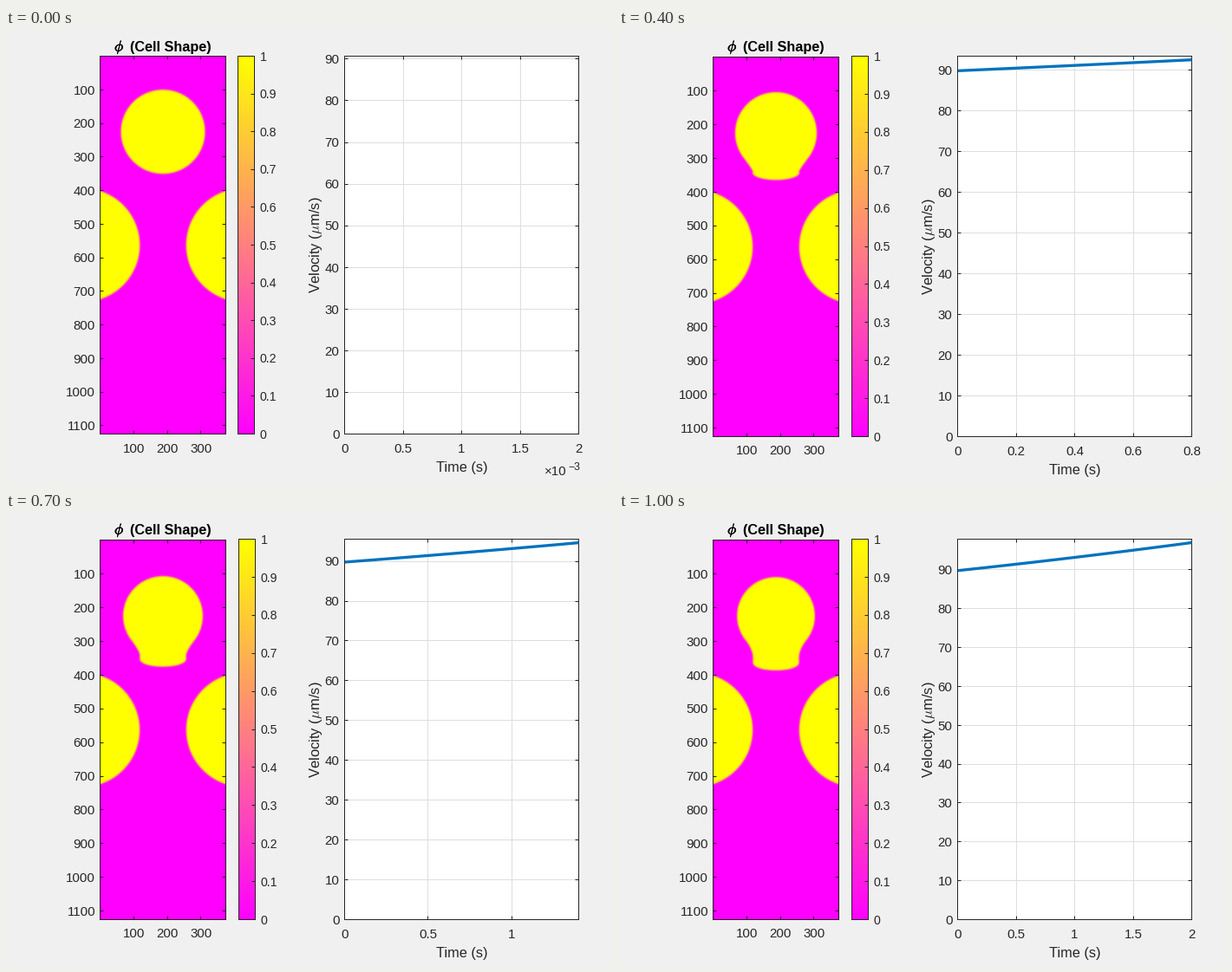
A matplotlib script that plays this animation: 700x525 px, repeating every 1.1 s.

```python
import matplotlib.pyplot as plt
import numpy as np
from matplotlib.animation import FuncAnimation
from matplotlib.patches import Rectangle
from matplotlib.path import Path
from matplotlib.patheffects import withStroke

W, H, DPI = 700, 525, 100
PX = 72 / DPI  # points per pixel
FRAMES = 11
DARK, GRID, BLUE = "#262626", "#dedede", "#0072bd"
TICK, BAR_TICK, LABEL = 15, 14.1, 16.3

plt.rcParams["font.family"] = "Liberation Sans"
plt.rcParams["mathtext.fontset"] = "cm"

fig = plt.figure(figsize=(W / DPI, H / DPI), dpi=DPI, facecolor="#f0f0f0")
ax = fig.add_axes([0, 0, 1, 1])


def line(xs, ys, color=DARK, width=1, z=4):
    return ax.plot(xs, ys, color=color, lw=width * PX, zorder=z, snap=False,
                   solid_capstyle="butt")[0]


def mid(v):
    """Centre of the pixel that holds v, for crisp hairlines."""
    return np.floor(v + 1e-6) + 0.5


def vline(x, y0, y1, color=DARK, z=4):
    line([mid(x)] * 2, [y0, y1], color, z=z)


def hline(y, x0, x1, color=DARK, z=4):
    line([x0, x1], [mid(y)] * 2, color, z=z)


def text(x, y, s, size=TICK, ha="center", color=DARK, **kw):
    ax.text(x, y, s, fontsize=size * PX, ha=ha, va="baseline", color=color,
            zorder=6, **kw)


def box(x0, y0, x1, y1, fill="none", z=4):
    patch = Rectangle((x0, y0), x1 - x0, y1 - y0, facecolor=fill,
                      edgecolor=DARK if fill == "none" else "none",
                      lw=PX, zorder=z, snap=False, joinstyle="miter")
    return ax.add_patch(patch)


def x_ticks(xs, y0, y1, size=4):
    for x in xs:
        vline(x, y0, y0 + size)
        vline(x, y1 - size, y1)


def y_ticks(ys, x0, x1, size=4, both=True):
    for y in ys:
        hline(y, x1 - size, x1)
        if both:
            hline(y, x0, x0 + size)


def cell_outline(n, cy):
    """Half widths and heights of the cell, from its top to its lowest point."""
    r = 48.5 - 0.37 * n
    if n == 0:
        a = np.linspace(0, np.pi, 400)
        return r * np.sin(a), cy - r * np.cos(a)

    def key(*vals):
        return np.interp(n, [1, 3, 6, 10], vals)

    theta = np.radians(key(39, 53, 53, 52))
    neck = key(28.5, 26.8, 26.7, 26.5)
    neck_top = key(160, 165, 166, 169.5)
    neck_low = key(160.3, 165.7, 169.2, 174.5)
    bottom = 169.6 + 1.42 * n
    power = key(1.8, 2, 2.1, 2.2)

    a = np.linspace(0, np.pi - theta, 260)
    arc = r * np.sin(a), cy - r * np.cos(a)

    # Shoulder leaves the circle along its tangent and ends upright
    ex, ey = arc[0][-1], arc[1][-1]
    my = min(ey + (ex - neck) * np.tan(theta), neck_top)
    t = np.linspace(0, 1, 80)
    shoulder = ((1 - t) ** 2 * ex + (1 - (1 - t) ** 2) * neck,
                (1 - t) ** 2 * ey + 2 * t * (1 - t) * my + t ** 2 * neck_top)

    wall = np.full(30, neck), np.linspace(neck_top, neck_low, 30)
    b = np.linspace(0, np.pi / 2, 160)
    c, s = np.clip(np.cos(b), 0, 1), np.sin(b)
    lobe = (neck * c ** (2 / power),
            neck_low + (bottom - neck_low) * s ** (2 / power))
    return [np.concatenate(part) for part in zip(arc, shoulder, wall, lobe)]


def phase_field(n, x0, x1, y0, y1, k):
    cx, top = (x0 + x1) / 2, y0 + 0.5
    x, y = np.meshgrid(np.arange(x0, x1) + 0.5, np.arange(y0, y1) + 0.5)
    u = np.abs(x - cx)

    # Obstacles, mirrored about the middle
    dist = 169 * k - np.hypot(u - 238 * k, y - (top + 562.5 * k))

    hw, hy = cell_outline(n, top + 225 * k)
    rows = slice(25, 165)
    pts = np.column_stack([u[rows].ravel(), y[rows].ravel()])
    d = np.full(len(pts), np.inf)
    for px, py in zip(hw, hy):
        d = np.minimum(d, (pts[:, 0] - px) ** 2 + (pts[:, 1] - py) ** 2)
    ring = np.column_stack([np.append(hw, -hw[::-1]), np.append(hy, hy[::-1])])
    sign = np.where(Path(ring).contains_points(pts), 1, -1)
    cell = (sign * np.sqrt(d)).reshape(u[rows].shape)
    dist[rows] = np.maximum(dist[rows], cell)
    return 0.5 * (1 + np.tanh(dist / 1.1))


def draw_cells(n, top, low):
    x0, x1 = 108, 254
    k = (low - top) / 1125
    ax.imshow(phase_field(n, x0, x1, top, low + 1, k), cmap="spring",
              vmin=0, vmax=1, extent=(x0, x1, low + 1, top), aspect="auto",
              interpolation="nearest", zorder=1)
    xl, xr, yt, yb = x0 + 0.5, x1 - 0.5, top + 0.5, low + 0.5
    box(xl, yt, xr, yb)
    cols, rows = np.arange(100, 301, 100), np.arange(100, 1101, 100)
    x_ticks(xl + 0.3875 * cols, yt, yb)
    y_ticks(yt + k * rows, xl, xr)
    for v in cols:
        text(xl + 0.3875 * v, low + (22 if n == 0 else 21), str(v))
    for v in rows:
        text(103, yt + k * v + 5.3, str(v), ha="right")
    text(125, 26.5, r"$\phi$", 17, ha="left", color="black",
         path_effects=[withStroke(linewidth=0.6 * PX, foreground="black")])
    text(236.3, 26.5, "(Cell Shape)", LABEL, ha="right", color="black",
         weight="bold")


def draw_bar(n, low):
    x0, top = (267, 32) if n == 0 else (268, 32)
    ax.imshow(np.linspace(1, 0, 256)[:, None], cmap="spring", vmin=0, vmax=1,
              extent=(x0, x0 + 20, low + 1, top), aspect="auto",
              interpolation="nearest", zorder=1)
    box(x0 + 0.5, top + 0.5, x0 + 19.5, low + 0.5)
    vals = np.arange(11) / 10
    ys = low + 0.5 - vals * (low - top)
    y_ticks(ys[1:-1], x0 + 0.5, x0 + 19.5, both=False)
    for v, y in zip(vals, ys):
        text(x0 + 25.5, y + 5.2, f"{v:g}", BAR_TICK, ha="left")


def velocity(t):
    return 89.7 + 3.2 * t + 0.2 * t ** 2


def draw_plot(n, low):
    x0, x1, y0, y1 = 390.5, 660.5, 32.5, low + 0.5
    end = 0.2 * n if n else 2
    step = {1: 0.05, 2: 0.1}.get(n, 0.2 if 0 < n < 7 else 0.5)
    y_max = velocity(0.2 * n) + 1

    frame = box(x0, y0, x1, y1, "white", z=1)
    box(x0, y0, x1, y1)
    tx = np.arange(0, end + 1e-6, step)
    if n == 6:
        tx = tx[:-1]  # last tick falls just outside the limit
    xs = x0 + tx / end * (x1 - x0)
    ty = np.arange(0, y_max, 10)
    ys = y1 - ty / y_max * (y1 - y0)
    for x in xs:
        vline(x, y0, y1, GRID, z=2)
    for y in ys:
        hline(y, x0, x1, GRID, z=2)
    x_ticks(xs, y0, y1)
    y_ticks(ys, x0, x1)
    for v, x in zip(tx, xs):
        text(x, low + 22, f"{v:g}")
    for v, y in zip(ty, ys):
        text(384.5, y + 5.3, f"{v:g}", ha="right")

    if n:
        t = np.linspace(0, end, 60)
        curve = line(x0 + t / end * (x1 - x0),
                     y1 - 0.5 - velocity(t) / y_max * (y1 - y0), BLUE, 3.3, z=5)
        curve.set_clip_path(frame)
    else:
        text(621, 515.5, "×10", ha="left")
        text(661.8, 509.5, "\u22123", 12.3, ha="right")

    text(525.5, low + 44, "Time (s)", LABEL)
    text(362.3, (y0 + y1) / 2, r"Velocity ($\mu$m/s)", LABEL + 0.3,
         rotation=90, rotation_mode="anchor")


def draw(n):
    ax.cla()
    ax.set_axis_off()
    top, low = (32, 468) if n == 0 else (33, 471)
    draw_cells(n, top, low)
    draw_bar(n, low)
    draw_plot(n, low)
    ax.set_xlim(0, W)
    ax.set_ylim(H, 0)
    return []


anim = FuncAnimation(fig, draw, frames=FRAMES, interval=100, repeat=True,
                     repeat_delay=0, blit=False)
plt.show()
```
